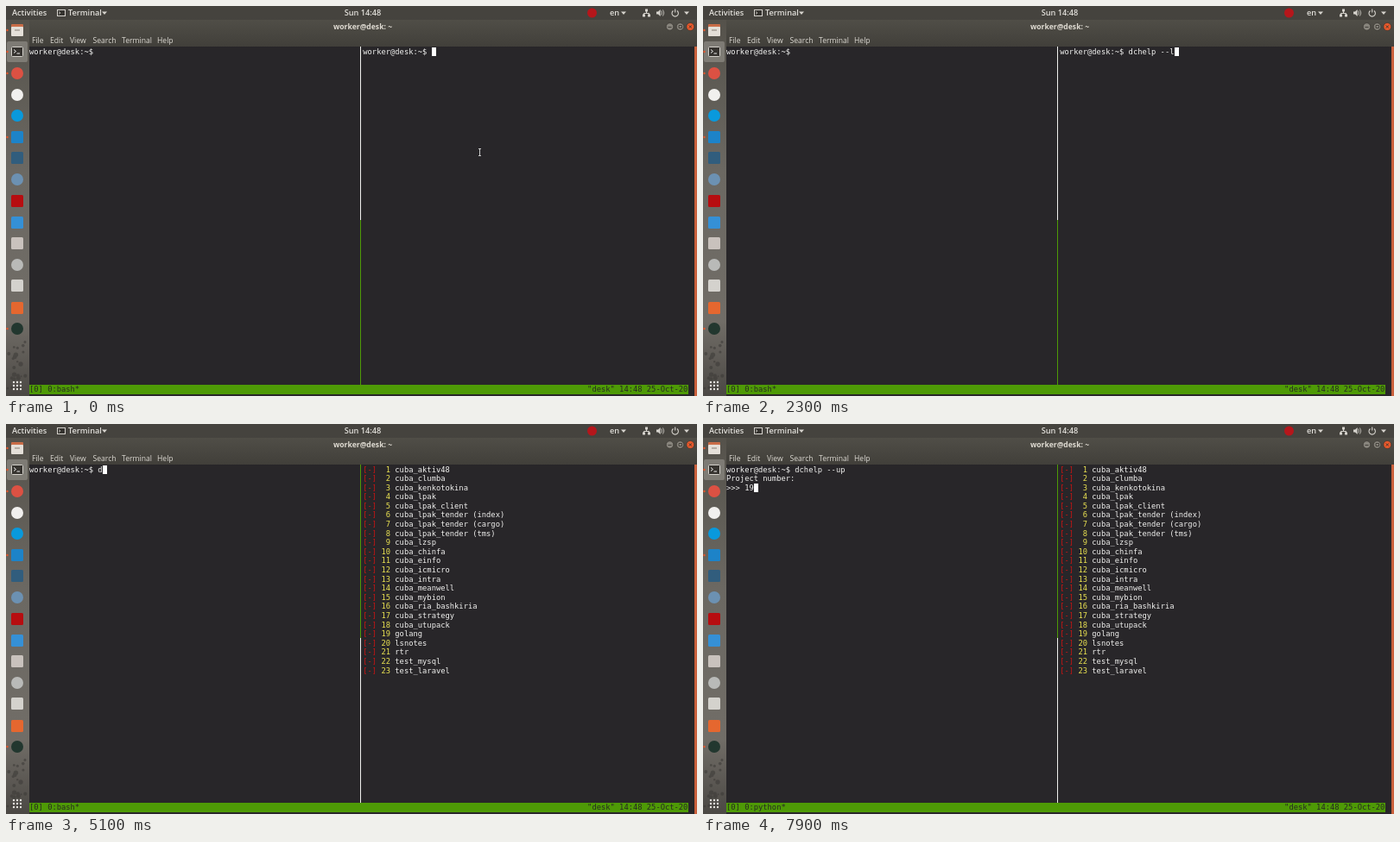
An HTML page for the animation above (8000 ms loop, 800x452 px).

```html
<!DOCTYPE html>
<html lang="en">
<head>
<meta charset="utf-8">
<title>Terminal session</title>
<style>
html, body { margin: 0; width: 100%; height: 100%; overflow: hidden; background: #282629; }
#stage { position: relative; width: 800px; height: 452px; overflow: hidden; background: #282629; }
#stage > * { position: absolute; }
#desk { left: 0; top: 0; }
#desk text { font-family: "Open Sans", "Noto Sans", sans-serif; }
.bar { font-size: 9.2px; font-weight: 600; fill: #e2e0db; }
.menu { font-size: 8.6px; fill: #dcd9d2; }
.title { font-size: 8.6px; font-weight: 700; fill: #dfdbd2; text-anchor: middle; }
.term {
  margin: 0; top: 47.5px; white-space: pre; color: #f2f2f0;
  font: 8.79px/10.6px "DejaVu Sans Mono", "Liberation Mono", monospace;
}
#left { left: 27px; }
#right { left: 413.3px; }
.term i { font-style: normal; color: #cf1414; }
.term b { font-weight: 400; color: #ebe352; }
#cursor { width: 5.3px; height: 10.6px; background: #fff; }
.split { left: 410px; width: 1px; }
#upper { top: 47px; height: 201px; }
#lower { top: 248px; height: 191px; }
#status { left: 27px; top: 439px; width: 763px; height: 11px; background: #4e9a06; }
#status .term { top: .3px; color: #262a22; }
#status div { position: absolute; }
#clock { right: .6px; }
</style>
</head>
<body>
<div id="stage">
  <svg id="desk" width="800" height="452" viewBox="0 0 800 452">
    <defs>
      <linearGradient id="dockFill" x2="0" y2="1">
        <stop offset="0" stop-color="#55524b"/>
        <stop offset=".4" stop-color="#6b6862"/>
        <stop offset=".8" stop-color="#716d67"/>
        <stop offset="1" stop-color="#4b4844"/>
      </linearGradient>
      <linearGradient id="titleFill" x2="0" y2="1">
        <stop offset="0" stop-color="#504e47"/>
        <stop offset="1" stop-color="#413f3a"/>
      </linearGradient>
    </defs>
    <rect x="26" y="16" width="774" height="31" fill="url(#titleFill)"/>
    <rect width="800" height="16" fill="#45433e"/>
    <rect y="16" width="27" height="436" fill="url(#dockFill)"/>
    <rect x="797" y="47" width="3" height="405" fill="#c9603c"/>
    <g id="specks" fill="#3b3936" opacity=".55"></g>

    <text class="bar" x="7" y="11">Activities</text>
    <text class="bar" x="72" y="11">Terminal</text>
    <text class="bar" x="413" y="11" text-anchor="middle">Sun 14:48</text>
    <text class="bar" x="699" y="11">en</text>
    <path d="M111 6.5h6l-3 3.5zM712 6.5h6l-3 3.5zM785 6.5h6l-3 3.5z" fill="#d6d3cd"/>
    <rect x="59.5" y="4.5" width="9" height="7" fill="#35332f" stroke="#d6d3cd"/>
    <path d="M61 6.5l2 1.5-2 1.5" fill="none" stroke="#d6d3cd" stroke-width=".8"/>
    <circle cx="678.5" cy="8" r="5.5" fill="#b5161b"/>
    <g fill="none" stroke="#d6d3cd">
      <path d="M741.5 6v2.5M738.5 10v-1.5h6V10"/>
      <path d="M758.5 5.5q2 2.5 0 5M760.5 4.5q2.5 3.5 0 7" stroke-width=".8"/>
      <path d="M772.5 5.5a3.7 3.7 0 1 0 4.4 0M774.7 3.5v4" stroke-width="1.1"/>
    </g>
    <path d="M740 3.5h3v3h-3zM737 9.5h3v3h-3zM743 9.5h3v3h-3zM753 6.5h2l2.5-2.5v8L755 9.500h-2z" fill="#d6d3cd"/>

    <text class="title" x="413" y="27">worker@desk: ~</text>
    <g class="menu">
      <text class="menu" x="30" y="43">File</text>
      <text class="menu" x="51" y="43">Edit</text>
      <text class="menu" x="74" y="43">View</text>
      <text class="menu" x="100.500" y="43">Search</text>
      <text class="menu" x="134" y="43">Terminal</text>
      <text class="menu" x="175" y="43">Help</text>
    </g>
    <g stroke="#35332f" stroke-width=".7">
      <circle cx="768.5" cy="24" r="4.3" fill="#87847c"/>
      <circle cx="780.5" cy="24" r="4.3" fill="#87847c"/>
      <circle cx="792.3" cy="24" r="4.5" fill="#e9592b"/>
    </g>
    <path d="M766.500 24.500h4M779 22.500h3.500v3h-3.500zM790.700 22.400l3.200 3.200m0-3.200l-3.200 3.200" fill="none" stroke="#3a3833" stroke-width=".9"/>

    <rect x="1" y="41" width="24" height="24" rx="2" fill="#8b8882" opacity=".75"/>
    <rect x="6" y="21" width="14" height="5" rx="1" fill="#c96d48"/>
    <rect x="6" y="24" width="14" height="11" rx="1" fill="#e4dfd8"/>
    <path d="M10 28h6" stroke="#a49d95" stroke-width="1.500"/>
    <rect x="6.500" y="47.500" width="13" height="11" rx="1" fill="#36332f" stroke="#d3d0ca"/>
    <path d="M9 50.500l2.500 2-2.500 2M12.500 55h3.500" fill="none" stroke="#eee"/>
    <g id="icons"></g>
    <g id="grid" fill="#e6e4e0"></g>
    <path id="beam" d="M547 165.500h3M548.500 166v7M547 173.500h3" fill="none" stroke="#dcdcdc" stroke-width=".9"/>
  </svg>
  <div id="upper" class="split"></div>
  <div id="lower" class="split"></div>
  <div id="cursor"></div>
  <pre id="left" class="term"></pre>
  <pre id="right" class="term"></pre>
  <div id="status">
    <div id="job" class="term"></div>
    <div id="clock" class="term">"desk" 14:48 25-Oct-20</div>
  </div>
</div>
<script>
const $ = id => document.getElementById(id);
const LOOP = 8000, COL = 5.292, ROW = 10.6, TOP = 47.5;
const PROMPT = 'worker@desk:~$ ';
const GREEN = '#4e9a06', WHITE = '#f0f0ee';

// Dock: shape, centre height, colour
const icons = [
  ['circle', 78, '#dc5143'], ['circle', 103, '#f1f0ee'], ['circle', 127, '#0999dc'],
  ['square', 152, '#1d83c8'], ['square', 176, '#315d7d'], ['circle', 201, '#6c91b2'],
  ['square', 226, '#b70d10'], ['square', 251, '#3590d6'], ['square', 275, '#c9c2bd'],
  ['circle', 300, '#b9bab8'], ['square', 324, '#d4d2cd'], ['square', 350, '#e5672f'],
  ['circle', 374, '#22372f']
];
const dot = (x, y, r, fill = '') =>
  `<circle cx="${x}" cy="${y}" r="${r}"${fill && ` fill="${fill}"`}/>`;
$('icons').innerHTML = icons.map(([shape, y, fill]) => shape === 'circle'
  ? dot(13, y, 7, fill)
  : `<rect x="6" y="${y - 7}" width="14" height="14" rx="1.5" fill="${fill}"/>`
).join('') + [28, 53, 78, 152, 374].map(y => dot(1.5, y, 1.2, '#e4562c')).join('');

let grid = '', specks = '', seed = 7;
const rand = () => (seed = seed * 16807 % 2147483647) / 2147483647;
for (let n = 0; n < 9; n++) grid += dot(9 + n % 3 * 4, 436 + Math.floor(n / 3) * 4, 1.2);
for (let n = 0; n < 22; n++) specks += dot(2 + rand() * 22, 386 + rand() * 62, .8 + rand() * 2);
$('grid').innerHTML = grid;
$('specks').innerHTML = specks;

const projects = ('cuba_aktiv48,cuba_clumba,cuba_kenkotokina,cuba_lpak,cuba_lpak_client,' +
  'cuba_lpak_tender (index),cuba_lpak_tender (cargo),cuba_lpak_tender (tms),cuba_lzsp,' +
  'cuba_chinfa,cuba_einfo,cuba_icmicro,cuba_intra,cuba_meanwell,cuba_mybion,' +
  'cuba_ria_bashkiria,cuba_strategy,cuba_utupack,golang,lsnotes,rtr,test_mysql,test_laravel').split(',');
const listing = projects.map((name, n) =>
  `<i>[-]</i> <b>${String(n + 1).padStart(2)}</b> ${name}`).join('\n');

// Typed text by time
const rightKeys = [
  [0, ''], [900, 'd'], [1000, 'dc'], [1200, 'dch'], [1400, 'dchelp '], [2000, 'dchelp -'],
  [2100, 'dchelp --'], [2300, 'dchelp --l'], [2500, 'dchelp --li'], [2700, 'dchelp --lis'],
  [2800, 'dchelp --list'], [3100, 'dchelp --list\n']
];
const ask = 'dchelp --up\nProject number:\n>>> ';
const leftKeys = [
  [0, ''], [5100, 'd'], [5200, 'dc'], [5300, 'dch'], [5500, 'dchelp '], [6000, 'dchelp -'],
  [6100, 'dchelp --'], [6600, 'dchelp --u'], [6700, 'dchelp --up'], [7200, 'dchelp --up\n'],
  [7300, ask], [7600, ask + '1'], [7800, ask + '19']
];
const LISTED = 3200, SWITCH = 4800;
const typed = (keys, t) => PROMPT + keys.filter(k => k[0] <= t).pop()[1];

function setText(el, text, prop = 'textContent') {
  if (el.shown !== text) el[prop] = el.shown = text;
}

function placeCursor(text, x, visible) {
  const lines = text.split('\n');
  const style = $('cursor').style;
  style.left = x + lines[lines.length - 1].length * COL + 'px';
  style.top = TOP + (lines.length - 1) * ROW + 'px';
  style.visibility = visible ? 'visible' : 'hidden';
}

function draw(t) {
  const left = typed(leftKeys, t), right = typed(rightKeys, t);
  const onLeft = t >= SWITCH, listed = t >= LISTED;
  setText($('left'), left);
  setText($('right'), listed ? listing : right, listed ? 'innerHTML' : 'textContent');
  const blinkOff = t >= 600 && t < 900;
  placeCursor(onLeft ? left : right, onLeft ? 27 : 413.3, onLeft || !(listed || blinkOff));
  $('upper').style.background = onLeft ? GREEN : WHITE;
  $('lower').style.background = onLeft ? WHITE : GREEN;
  $('beam').style.visibility = t < 900 ? 'visible' : 'hidden';
  setText($('job'), t >= 7900 ? '[0] 0:python*' : '[0] 0:bash*');
}

const start = performance.now();
function tick() {
  draw((performance.now() - start) % LOOP);
  requestAnimationFrame(tick);
}
tick();
</script>
</body>
</html>
```
